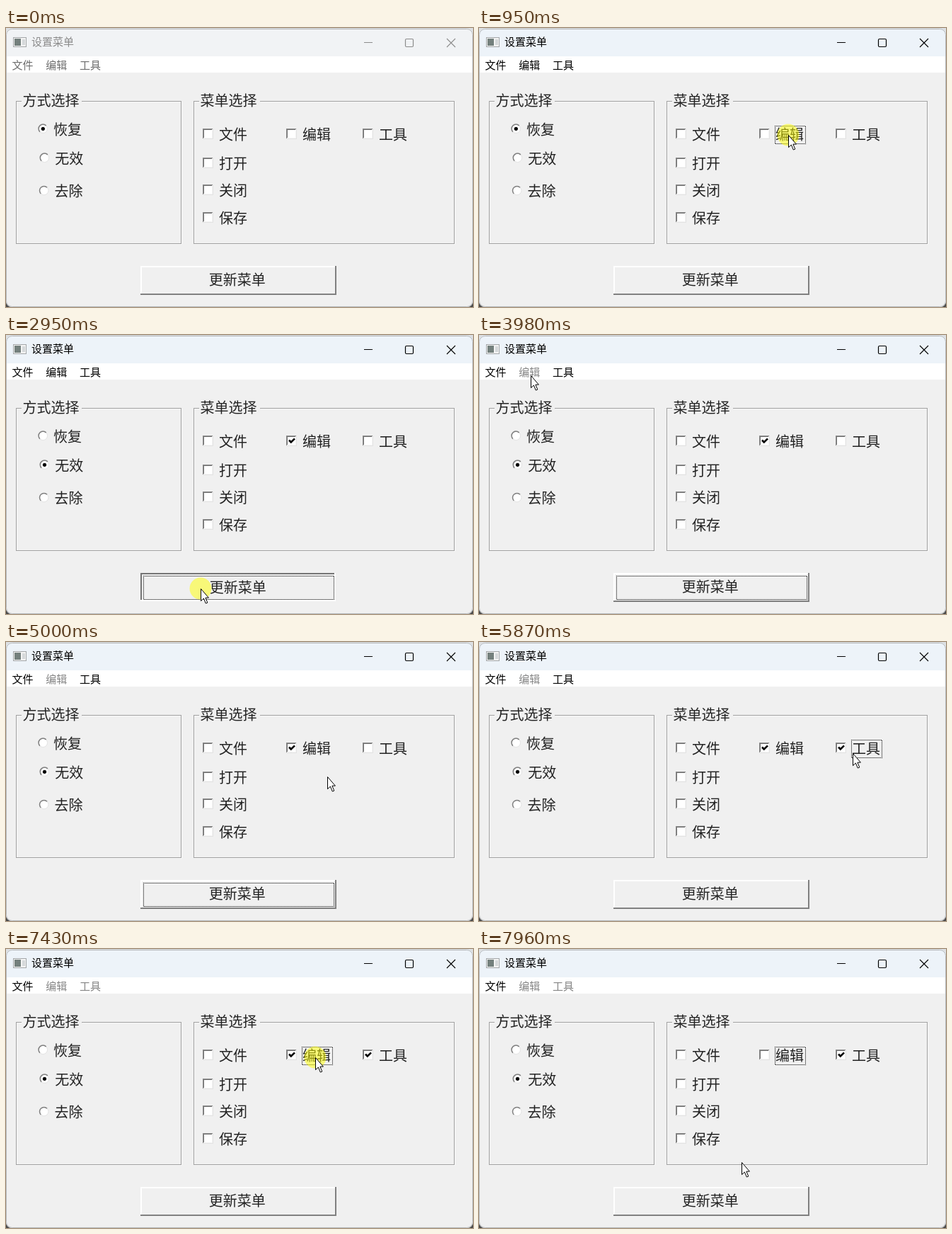
An HTML page for the animation above (8000 ms loop, 660 by 394 pixels).

```html
<!DOCTYPE html>
<html lang="zh-CN">
<head>
<meta charset="utf-8">
<title>设置菜单</title>
<style>
html, body { margin: 0; width: 100%; height: 100%; overflow: hidden; }
svg { display: block; width: 660px; height: 394px; }
text { font-family: "Noto Sans CJK SC", "Noto Sans CJK", sans-serif; white-space: pre; }
.dialog { font-size: 20px; font-weight: 300; fill-opacity: 0.86; }
.small { font-size: 15px; }
.crisp { shape-rendering: crispEdges; }
.focus { fill: none; stroke: #000; stroke-dasharray: 1 1; stroke-dashoffset: 0.5; }
</style>
</head>
<body>
<svg id="stage" viewBox="0 0 660 394"></svg>
<script>
const LOOP = 8000, TICK = 68.5;
const stage = document.getElementById("stage");

function add(tag, attrs, parent = stage) {
  const el = document.createElementNS("http://www.w3.org/2000/svg", tag);
  for (const key in attrs) el.setAttribute(key, attrs[key]);
  parent.appendChild(el);
  return el;
}
const rect = (x, y, width, height, fill, more = {}, parent) =>
  add("rect", { x, y, width, height, fill, ...more }, parent);
const path = (d, stroke, more = {}, parent) => add("path", { d, stroke, fill: "none", ...more }, parent);
const show = (el, on) => el.setAttribute("visibility", on ? "visible" : "hidden");

// Text placed by its left edge and vertical middle
function label(str, x, mid, size, cls) {
  const el = add("text", { x, y: mid + size * 0.38, class: cls });
  el.textContent = str;
  return el;
}
const dialogText = (str, x, mid) => label(str, x, mid, 20, "dialog");
const smallText = (str, x, mid) => label(str, x, mid, 15, "small");

// Two-tone edge: one colour on the top left, another on the bottom right
function bevel(x, y, w, h, light, dark, parent, thick = 1) {
  const half = thick / 2, more = { class: "crisp", "stroke-width": thick };
  path(`M${x + half} ${y + h}V${y + half}H${x + w}`, light, more, parent);
  path(`M${x} ${y + h - half}H${x + w - half}V${y}`, dark, more, parent);
}
const focusRect = (x, y, w, h) =>
  rect(x + 0.5, y + 0.5, w, h, "none", { class: "focus crisp" });

// Window frame
rect(0, 0, 660, 200, "#dcdfe2");
rect(0, 200, 660, 194, "#4a4a4a");
const clip = add("clipPath", { id: "frame" });
rect(0, 1, 660, 393, "#000", { rx: 8 }, clip);
const win = add("g", { "clip-path": "url(#frame)" });
const titleBar = rect(0, 0, 660, 40, "", {}, win);
rect(0, 40, 660, 23, "#fff", {}, win);
rect(0, 63, 660, 331, "#f0f0f0", {}, win);
rect(0.5, 1.5, 659, 392, "none", { rx: 8, stroke: "#b4b7ba" });

// Title bar and menu
rect(10.5, 13.5, 18, 13, "#f4f4f4", { stroke: "#a3a6a8" });
rect(12, 15, 9, 10, "#74807d");
rect(23, 16, 4, 8, "#d5d8da");
const title = smallText("设置菜单", 36, 19.5);
const sysButtons = path("M506 20.5H518M623 15L635 27M635 15L623 27", "", { "stroke-width": 1.1 });
const maxButton = rect(564.5, 15.5, 11, 11, "none", { rx: 1.5, "stroke-width": 1.2 });
const menus = ["文件", "编辑", "工具"].map((str, i) => smallText(str, 8.5 + i * 47.7, 52));

function group(str, x, w, gapEnd) {
  const d = `M${x + 8} 103.5H${x + 0.5}V304.5H${x + w + 0.5}V103.5H${gapEnd}`;
  path(d, "#fff", { transform: "translate(1 1)", class: "crisp", opacity: 0.5 });
  path(d, "#a0a0a0", { class: "crisp" });
  dialogText(str, x + 9.5, 102.7);
}
group("方式选择", 14, 233, 107);
group("菜单选择", 265, 368, 359);

function radio(str, x, y) {
  add("circle", { cx: x, cy: y, r: 6.2, fill: "#fff", stroke: "#e3e3e3" });
  path(`M${x - 4.4} ${y + 4.4}a6.2 6.2 0 0 1 8.8 -8.8`, "#808080", { "stroke-width": 1.5 });
  const dot = add("circle", { cx: x, cy: y, r: 2.6 });
  dialogText(str, x + 14.7, y + 0.7);
  return dot;
}
const restoreDot = radio("恢复", 52.3, 142.3);
const disableDot = radio("无效", 54.5, 183.3);
show(radio("去除", 53.7, 229.6), false);

function checkbox(str, x, mid) {
  const y = mid - 8;
  rect(x, y, 15, 15, "#fff");
  bevel(x, y, 15, 15, "#8a8a8a", "#e3e3e3");
  bevel(x + 1, y + 1, 13, 13, "#757575", "#f4f4f4");
  const mark = path(`M${x + 4} ${y + 6.5}l2.8 3l5.2 -5.2`, "#000", { "stroke-width": 2.6 });
  show(mark, false);
  dialogText(str, x + 23, mid + 0.5);
  return mark;
}
checkbox("文件", 278, 150);
const editMark = checkbox("编辑", 396, 150);
const toolMark = checkbox("工具", 504, 150);
["打开", "关闭", "保存"].forEach((str, i) => checkbox(str, 278, 191 + i * 38.5 | 0));

// Push button, raised and sunken
const raised = add("g", {}), sunken = add("g", {});
bevel(190, 336, 277, 41, "#fff", "#808080", raised, 2);
bevel(190, 336, 276, 40, "#757575", "#fff", sunken, 2);
const buttonText = dialogText("更新菜单", 286.7, 355.4);

const focus = {
  edit: focusRect(418, 138, 43, 25),
  tool: focusRect(526, 138, 43, 25),
  radio: focusRect(67, 171, 44, 25),
  button: focusRect(194, 340, 269, 33)
};

const halo = add("circle", { r: 15.5, fill: "#ff0", opacity: 0.5 });
const cursor = path("M.5 .5V17.6L4.4 14L7.3 21L9.8 20L6.9 13.1H11.4Z", "#000", { fill: "#fff" });

const entry = { x: 590, y: 390 };
const moves = [
  { from: 70, to: 810, x: 437, y: 151 },
  { from: 1160, to: 1930, x: 101, y: 184 },
  { from: 2200, to: 2880, x: 275, y: 358 },
  { from: 3360, to: 3980, x: 73, y: 57 },
  { from: 4240, to: 5070, x: 454, y: 190 },
  { from: 5260, to: 5530, x: 568, y: 153 },
  { from: 5730, to: 5870, x: 528, y: 157 },
  { from: 5870, to: 6410, x: 361, y: 345 },
  { from: 6870, to: 7280, x: 437, y: 153 },
  { from: 7770, to: 7960, x: 371, y: 301 }
];
const clicks = [
  { from: 950, to: 1160, on: "edit" },
  { from: 2000, to: 2200, on: "radio" },
  { from: 2880, to: 3080, on: "button" },
  { from: 5530, to: 5730, on: "tool" },
  { from: 6550, to: 6610, on: "button" },
  { from: 7350, to: 7500, on: "edit" }
];
const [editOn, disable, update, toolOn, update2, editOff] = clicks;
const easeOut = f => 1 - (1 - f) ** 3;

function pointerAt(t) {
  const i = moves.findLastIndex(m => m.from <= t);
  const a = moves[i - 1] || entry, b = moves[i];
  const span = b.to - b.from, steps = Math.round(span / TICK);
  const f = easeOut(Math.min(1, Math.floor((t - b.from) / span * steps + 0.02) / steps));
  return [a.x + (b.x - a.x) * f, a.y + (b.y - a.y) * f].map(Math.round);
}

function draw(t) {
  const active = t >= editOn.from;
  const ink = active ? "#000" : "#8c8c8c";
  titleBar.setAttribute("fill", active ? "#edf3f9" : "#f1f3f5");
  title.setAttribute("fill", ink);
  sysButtons.setAttribute("stroke", ink);
  maxButton.setAttribute("stroke", ink);

  const greyed = [false, t >= update.to, t >= update2.to];
  menus.forEach((m, i) => m.setAttribute("fill", !active ? "#6d6d6d" : greyed[i] ? "#858585" : "#000"));

  show(restoreDot, t < disable.to);
  show(disableDot, t >= disable.to);
  show(editMark, t >= editOn.to && t < editOff.to);
  show(toolMark, t >= toolOn.to);

  const last = clicks.findLast(c => c.from <= t);
  const down = last && t < last.to;
  const pressed = down && last.on === "button";
  show(raised, !pressed);
  show(sunken, pressed);
  buttonText.setAttribute("transform", pressed ? "translate(1 1)" : "");
  for (const key in focus) show(focus[key], last && last.on === key);

  const visible = t >= moves[0].from;
  show(cursor, visible);
  show(halo, down);
  if (visible) {
    const place = `translate(${pointerAt(t)})`;
    cursor.setAttribute("transform", place);
    halo.setAttribute("transform", place);
  }
}

const start = performance.now();
function tick() {
  draw((performance.now() - start) % LOOP);
  requestAnimationFrame(tick);
}
tick();
</script>
</body>
</html>
```
